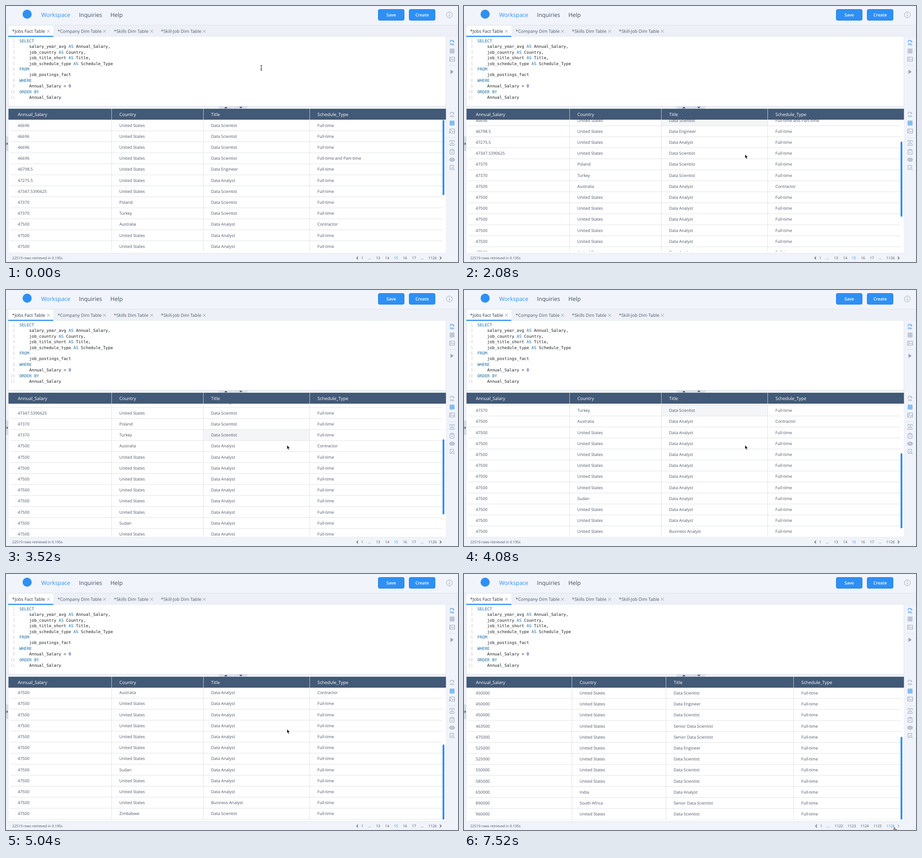
These frames come from a looping animation (995 px wide and 563 px high, 7.6 s). An HTML page:

```html
<!DOCTYPE html>
<html lang="en">
<head>
<meta charset="utf-8">
<title>Query workspace</title>
<style>
html, body { margin: 0; width: 100%; height: 100%; overflow: hidden; background: #f0f3f9; }
svg { display: block; }
text { font-family: "Open Sans", "Noto Sans", sans-serif; fill: #4a5568; white-space: pre; text-rendering: geometricPrecision; }
.code { font: 9px "DejaVu Sans Mono", monospace; fill: #1c1f24; }
.num { font: 9px "DejaVu Sans Mono", monospace; fill: #cdd0d6; }
.key { fill: #1f6ea5; }
.digit { fill: #1a2f9c; }
.icon { fill: none; stroke: #94a5bf; }
.icon.on { stroke: #2e90f0; }
.icon text { font-size: 5px; font-weight: 700; stroke: none; fill: #94a5bf; }
.icon.on text { fill: #2e90f0; }
</style>
</head>
<body>
<svg id="stage" width="995" height="563" viewBox="0 0 995 563"></svg>
<script>
const LOOP = 7600, STEP = 80, ROW = 24.2, TOP = 250.3, SWAP = 7360;
const BLUE = '#2e90f5', SLATE = '#94a5bf', US = 'United States', FT = 'Full-time';
const DS = 'Data Scientist', DA = 'Data Analyst', DE = 'Data Engineer', SENIOR = 'Senior Data Scientist';

const rect = (x, y, w, h, fill, more = '') =>
  `<rect x="${x}" y="${y}" width="${w}" height="${h}" fill="${fill}" ${more}/>`;
const path = (d, stroke, more = '') => `<path d="${d}" fill="none" stroke="${stroke}" ${more}/>`;
const fillPath = (d, fill) => `<path d="${d}" fill="${fill}"/>`;
const text = (x, y, s, size, more = '') => `<text x="${x}" y="${y}" font-size="${size}" ${more}>${s}</text>`;
const mid = (x, y, s, size, more = '') => text(x, y, s, size, 'text-anchor="middle" ' + more);
const paint = c => `style="fill:${c}"`;

const repeat = (n, row) => Array(n).fill(row);
const first = {
  lines: [232.5, 434.5, 668.5],
  rows: [
    ...repeat(3, [46696, US, DS]), [46696, US, DS, 'Full-time and Part-time'],
    [46798.5, US, DE], [47275.5, US, DA], ['47347.5390625', US, DS],
    [47370, 'Poland', DS], [47370, 'Turkey', DS], [47500, 'Australia', DA, 'Contractor'],
    ...repeat(6, [47500, US, DA]), [47500, 'Sudan', DA], ...repeat(2, [47500, US, DA]),
    [47500, US, 'Business Analyst'], [47500, 'Zimbabwe', DS]
  ],
  pages: [[784, 1], [800, '...'], [819, 13], [839, 14], [858.3, 15], [878.3, 16], [898, 17], [916, '...'], [939, 1126]],
  current: 15, prev: 773.5, next: '#4a5568'
};
const last = {
  lines: [237.5, 444.5, 725.5],
  rows: [
    [450000, US, DS], [450000, US, DE], [450000, US, DS], [463500, US, SENIOR], [475000, US, SENIOR],
    [525000, US, DE], [525000, US, DS], [550000, US, DS], [585000, US, DS],
    [650000, 'India', DA], [890000, 'South Africa', SENIOR], [960000, US, DS]
  ],
  pages: [[786, 1], [802, '...'], [825.3, 1122], [853.6, 1123], [882, 1124], [910.5, 1125], [939, 1126]],
  current: 1126, prev: 775.5, next: '#a9b4c4'
};

function topBar() {
  const button = (x, w, s) => rect(x, 7.5, w, 24, BLUE, 'rx="3" stroke="#1c79d8"') +
    mid(x + w / 2, 23, s, 9.4, 'font-weight="600" ' + paint('#fff'));
  return rect(0, 0, 995, 42, '#f1f4fb') + rect(0, 42, 995, 26, '#edf0f6') + rect(0, 41.5, 995, 1.5, '#e3e7ee') +
    `<circle cx="46.5" cy="18" r="10" fill="${BLUE}"/>` +
    text(77.5, 24, 'Workspace', 12.5, paint(BLUE)) +
    text(160.5, 24, 'Inquiries', 12.5, paint('#3d4b60')) + text(229.8, 24, 'Help', 12.5, paint('#3d4b60')) +
    button(819.5, 57, 'Save') + button(887.5, 57, 'Create') +
    `<circle cx="976" cy="19.5" r="6.5" fill="none" stroke="${SLATE}"/>` +
    path('M976 18.5v4.5M976 15.6v1.4', SLATE, 'stroke-width="1.3"');
}

function tabs() {
  const list = [[13.5, 93.3, '*Jobs Fact Table'], [113.5, 216.8, '*Company Dim Table'],
    [237.5, 320.5, '*Skills Dim Table'], [341, 436.5, '*Skill-Job Dim Table']];
  return rect(6, 43, 98, 25, '#fff') + rect(5, 65.5, 99, 2.5, BLUE) +
    list.map(([x, close, s], i) => text(x, 59, s, 9.8, paint(i ? '#4a5a70' : '#2c3440')) +
      path(`M${close - 3} 52.5l6 6m0-6l-6 6`, '#8492a8')).join('');
}

function editor() {
  const lines = ['SELECT', '    salary_year_avg AS Annual_Salary,', '    job_country AS Country,',
    '    job_title_short AS Title,', '    job_schedule_type AS Schedule_Type', 'FROM',
    '    job_postings_fact', 'WHERE', '    Annual_Salary > 0', 'ORDER BY', '    Annual_Salary'];
  const color = s => s.replace('>', '&gt;')
    .replace(/\b(SELECT|AS|FROM|WHERE|ORDER BY)\b/g, '<tspan class="key">$1</tspan>')
    .replace(/ 0$/, ' <tspan class="digit">0</tspan>');
  return rect(5.5, 68, 963, 153, '#fff') + lines.map((s, i) => {
    const y = 79.7 + i * 12.45;
    return `<text class="num" x="19.8" y="${y}" text-anchor="end">${i + 1}</text>` +
      `<text class="code" x="29.4" y="${y}">${color(s)}</text>`;
  }).join('');
}

function frame() {
  return rect(0, 220.5, 969, 5.5, '#eef1f6') + path('M5 220.5H969', '#dfe3ea') +
    fillPath('M467 221h66l-3 5h-60z', '#d9dee7') + path('M500.5 221v5', '#f0f3f9') +
    fillPath('M480.5 225l3.5-3.5 3.5 3.5zM513.5 221.8h7l-3.5 3.2z', '#3f4a5a') +
    path('M5.5 68V544M968.5 68V226M968.5 250V544', '#e0e4eb') +
    rect(0, 287, 5.5, 32, '#d6dce6') + fillPath('M1.5 300l3 3-3 3z', '#3f4a5a');
}

function icons() {
  const icon = (y, body, on) => `<g class="icon${on ? ' on' : ''}" transform="translate(982 ${y})">${body}</g>`;
  const label = (y, s) => `<text x="0" y="${y}" text-anchor="middle">${s}</text>`;
  const sql = '<path d="M-4-.5V-5.5H1.5L4-3V-.5M1.5-5.5V-3H4"/>' + label(5, 'SQL');
  const grid = '<path d="M-4.5-4.5h9v9h-9zM-4.5-1.5h9M-4.5 1.5h9M-1.5-4.5v9M1.5-4.5v9"/>';
  const image = '<path d="M-5.5-4.5h11v9h-11zM-5 3L-1.5-.5 1 2 3 0l2.5 2.5"/><circle cx="-2.6" cy="-2" r=".7"/>';
  return icon(81, sql, true) + icon(99, grid) + icon(117, image) + path('M973 130.5h18M973 289.5h18', '#dde2ea') +
    fillPath('M978.5 140l7 4.7-7 4.7z', SLATE) +
    icon(239, sql) + icon(257.5, grid, true) + icon(275, image) +
    icon(301, '<path d="M-2-5h-3v3M2-5h3v3M-5 3v2.5H5V3M0-1v-4.5M-1.7-4L0-5.7 1.7-4"/>' + label(3.3, 'CSV')) +
    icon(320.5, '<path d="M-2-4h-2.5v9.5h9V-4H2M-2-5.5h4v2.5h-4zM-2 1L-.5 2.5 2.3-.5"/>') +
    icon(338, '<ellipse rx="5.5" ry="3.8"/><path d="M-5.5-1.2h11M-5.5 1.2h11M-2-3.5v7M2-3.5v7"/>') +
    icon(356, '<path d="M3.5-2V-5.5h-8v9H-1"/><circle cx="1.6" cy="1.2" r="2.4"/><path d="M3.3 3L6 5.5"/>');
}

function headerRow(page) {
  const names = ['Annual_Salary', 'Country', 'Title', 'Schedule_Type'];
  return rect(5.5, 226, 963, 24, '#425977') +
    names.map((s, i) => text(i ? page.lines[i - 1] + 17 : 26, 241.5, s, 9.9, 'font-weight="500" ' + paint('#fff'))).join('') +
    path(page.lines.map(x => `M${x} 226v24`).join(''), '#c3ccd8');
}

function tableRows(page) {
  return page.rows.map((row, i) => {
    const cells = [...row, FT].slice(0, 4);
    return path(`M9 ${(i + 1) * ROW}H961`, '#dfe2e7') +
      cells.map((s, c) => text(c ? page.lines[c - 1] + 17 : 25.8, i * ROW + 15.4, s, 9)).join('');
  }).join('');
}

const columnLines = page => path(page.lines.map(x => `M${x} 250V540`).join(''), '#dfe2e7');

function footer(page) {
  const chevron = (x, d, c) => path(`M${x} 551.2l${d} 3 ${-d} 3`, c, 'stroke-width="1.3"');
  return rect(0, 544, 995, 19, '#f0f3f9') + path('M5 543.7H969', '#e4e8ee') +
    text(13.8, 557, '22519 rows retrieved in 0.195s', 7.8) +
    chevron(page.prev + 1.5, -3, '#4a5568') + chevron(955, 3, page.next) +
    page.pages.map(([x, s]) => mid(x, 557, s, 8, s === page.current ? paint(BLUE) : '')).join('');
}

const view = (page, id) => `<g id="${id}"><g clip-path="url(#body)">
  <rect id="${id}Hover" fill="#f4f5f6"/><g id="${id}Rows">${tableRows(page)}</g>${columnLines(page)}</g>
  ${headerRow(page)}${footer(page)}</g>`;

const stage = document.getElementById('stage');
stage.innerHTML = `<clipPath id="body"><rect x="6" y="250" width="960" height="290"/></clipPath>` +
  rect(0, 0, 995, 563, '#f0f3f9') + topBar() + tabs() + editor() + frame() + icons() +
  rect(5.5, 250, 963, 294, '#fff') + view(first, 'a') + view(last, 'b') +
  `<rect id="thumb" x="961" width="4" rx="1.5" fill="${BLUE}"/>
  <g id="cursor">
    <path id="beam" d="M-2-5.5Q0-5.5 0-4Q0-5.5 2-5.5M0-4V4M-2 5.5Q0 5.5 0 4Q0 5.5 2 5.5M-1.2 1.5H1.2" fill="none" stroke="#222"/>
    <path id="arrow" d="M0 0V9.3L2.1 7.4 3.7 11 5.4 10.2 3.8 6.8H6.7Z" fill="#111" stroke="#fff" stroke-width=".8"/>
    <path id="hand" d="M-1 1Q0-.6 1 1V4.3L5.5 5.2Q7 5.6 6.7 7.5L6 12H0L-3.5 7Q-3.6 5.4-2 6L-1 7Z" fill="#fff" stroke="#111"/>
  </g>`;
const el = id => document.getElementById(id);
const show = (id, on) => el(id).setAttribute('display', on ? 'inline' : 'none');
const set = (id, values) => Object.entries(values).forEach(([k, v]) => el(id).setAttribute(k, v));

// Monotone cubic through [time, value] points; flat at both ends.
function curve(points) {
  const slope = points.slice(1).map((p, i) => (p[1] - points[i][1]) / (p[0] - points[i][0]));
  const tangent = points.map((_, i) => {
    const a = slope[i - 1] || 0, b = slope[i] || 0;
    return a * b > 0 ? 2 * a * b / (a + b) : 0;
  });
  return t => {
    if (t <= points[0][0]) return points[0][1];
    const i = points.findIndex(p => p[0] >= t) - 1;
    if (i < 0) return points.at(-1)[1];
    const [t0, v0] = points[i], [t1, v1] = points[i + 1], d = t1 - t0, u = (t - t0) / d;
    const ease = u * u * (3 - 2 * u);
    return v0 + (v1 - v0) * ease + d * u * (1 - u) * (tangent[i] * (1 - u) - tangent[i + 1] * u);
  };
}

const scrollAt = curve([[1200, 0], [1440, 17.3], [2080, 83.7], [2600, 115], [3200, 115],
  [3520, 137], [4080, 191], [4720, 216], [5040, 219.2]]);
const moves = [[160, 562, 136], [800, 618.5, 326], [2700, 618.5, 326], [3000, 618.5, 341],
  [5520, 618.5, 341], [6480, 947.5, 557.5]];
const cursorX = curve(moves.map(m => [m[0], m[1]]));
const cursorY = curve(moves.map(m => [m[0], m[2]]));

// The highlighted cell only changes while the pointer moves, not while scrolling.
const lastMove = t => t > 3000 && t < 5520 ? 3000 : t > 800 && t < 2700 ? 800 : t;

function drawHover(t, scroll) {
  const m = lastMove(t), x = cursorX(m), y = cursorY(m);
  const inside = y > 250 && y < 540;
  show('aHover', inside);
  if (!inside) return;
  const edges = [9, ...first.lines, 961], c = edges.findIndex(e => e > x) - 1;
  const row = Math.floor((y - TOP + scrollAt(m)) / ROW);
  if (c < 0) return show('aHover', false);
  set('aHover', { x: edges[c], width: edges[c + 1] - edges[c], y: TOP + row * ROW - scroll, height: ROW });
}

function draw(now) {
  const t = Math.floor(now % LOOP / STEP) * STEP;
  const swapped = t >= SWAP, scroll = scrollAt(t), x = cursorX(t), y = cursorY(t);
  show('a', !swapped);
  show('b', swapped);
  show('bHover', false);
  set('aRows', { transform: `translate(0 ${TOP - scroll})` });
  set('bRows', { transform: `translate(0 ${TOP - 0.8})` });
  set('thumb', swapped ? { y: 358, height: 182 } : { y: 250.8 + scroll * 0.567, height: 165 });
  drawHover(t, scroll);
  const overEditor = y < 221, overLink = y > 548 && x > 928;
  show('beam', overEditor);
  show('hand', overLink);
  show('arrow', !overEditor && !overLink);
  set('cursor', { transform: `translate(${x} ${y})` });
}

const start = performance.now();
function tick() {
  draw(performance.now() - start);
  requestAnimationFrame(tick);
}
tick();
</script>
</body>
</html>
```
